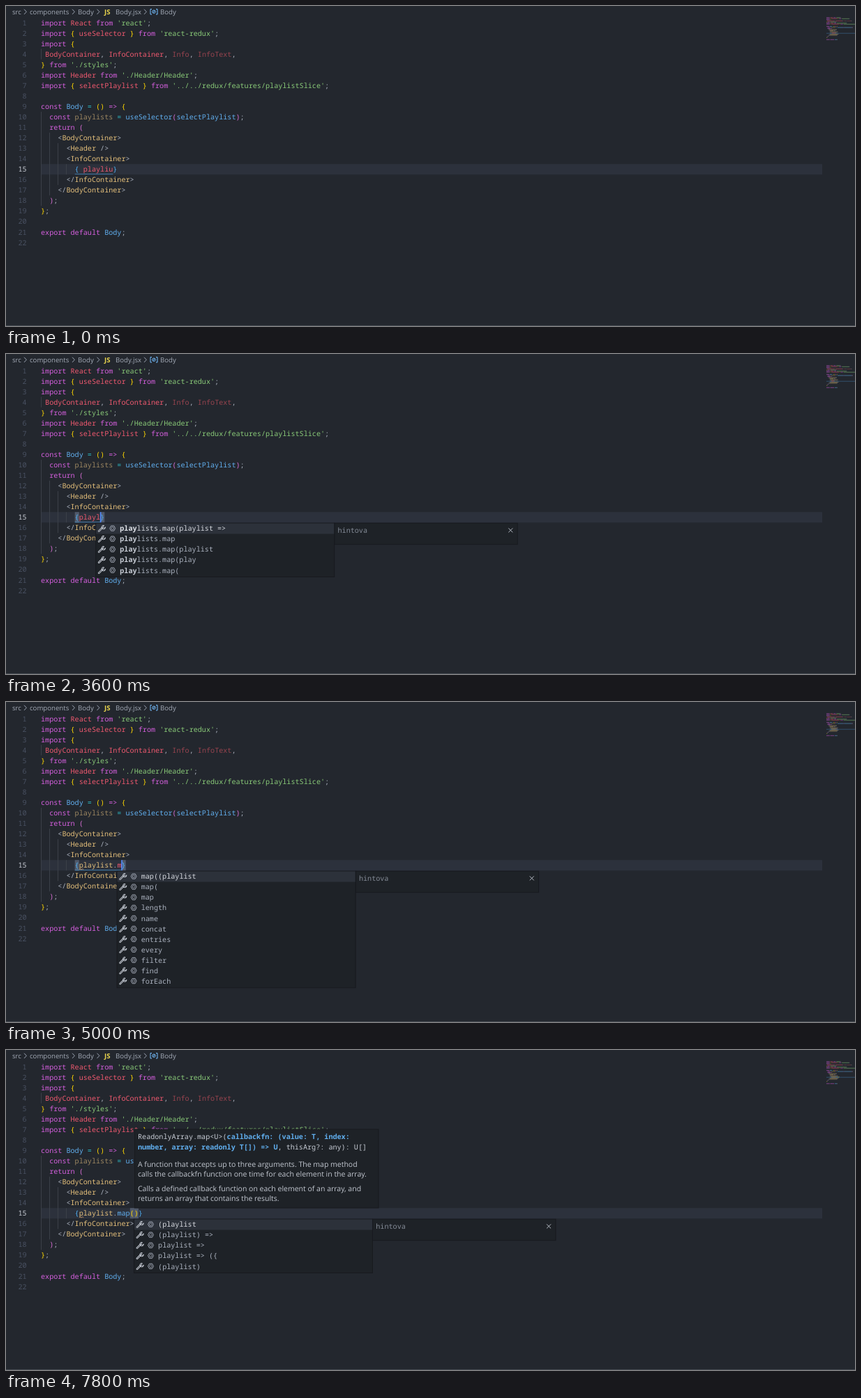
Recreate the animation shown at these times as an HTML page. Size 1217x460 px, loop 8 s.

```html
<!DOCTYPE html>
<html lang="en">
<head>
<meta charset="utf-8">
<title>Editor typing</title>
<style>
html, body { margin: 0; width: 100%; height: 100%; overflow: hidden; background: #23272e; }
svg { display: block; width: 100%; height: 100%; }
text { white-space: pre; text-rendering: geometricPrecision; }
.mono { font: 10.142px "Noto Sans Mono", "DejaVu Sans Mono", monospace; }
.ui { font: 9.65px "Open Sans", "Noto Sans", sans-serif; }
.doc { font: 10.5px "Open Sans", "Noto Sans", sans-serif; }
.b { font-weight: 700; }
</style>
</head>
<body>
<svg viewBox="0 0 1217 460">
  <g id="under"></g>
  <g id="base"></g>
  <g id="over"></g>
</svg>
<script>
const LOOP = 8000, X0 = 50, CW = 6.085, Y0 = 16.5, LH = 15.05;
const C = {
  p: '#d55fde', r: '#ef596f', g: '#89ca78', b: '#61afef', y: '#e5c07b', c: '#2bbac5', w: '#abb2bf',
  R: '#98444f', Y: '#9d8761', 1: '#ffd700', 2: '#da70d6', 3: '#4fb0f5'
};

// Each token is a colour key followed by its text.
const CODE = [
  "pimport |rReact |pfrom |g'react'|w;",
  "pimport |1{ |ruseSelector |1} |pfrom |g'react-redux'|w;",
  "pimport |1{",
  "w |rBodyContainer|w, |rInfoContainer|w, |RInfo|w, |RInfoText|w,",
  "1} |pfrom |g'./styles'|w;",
  "pimport |rHeader |pfrom |g'./Header/Header'|w;",
  "pimport |1{ |rselectPlaylist |1} |pfrom |g'../../redux/features/playlistSlice'|w;",
  "",
  "pconst |bBody |c= |1() |p=> |1{",
  "w  |pconst |Yplaylists |c= |buseSelector|2(|bselectPlaylist|2)|w;",
  "w  |preturn |2(",
  "w    <|yBodyContainer|w>",
  "w      <|yHeader |w/>",
  "w      <|yInfoContainer|w>",
  "",
  "w      </|yInfoContainer|w>",
  "w    </|yBodyContainer|w>",
  "w  |2)|w;",
  "1}|w;",
  "",
  "pexport |pdefault |bBody|w;",
  ""
];

const LISTS = {
  open: ['playlists.map((playlist', 'playlists', 'playlists.map', 'playlist', 'play'],
  p: ['playlists', 'playlistSlice', 'play', 'public', 'private'],
  play: ['playlists.map(playlist =>', 'playlists.map', 'playlists.map(playlist', 'playlists.map(play', 'playlists.map('],
  playlist: ['playlists.map(playlist =>', 'playlists.map(playlist', 'playlists.map(playlist => ({', 'playlists.map(play', 'playlists.length'],
  dot: ['map((playlist', 'map(', 'map', 'length', 'name', 'concat', 'entries', 'every', 'filter', 'find', 'forEach'],
  m: ['map((playlist', 'map(playlist', 'map', 'map(', 'map(('],
  map: ['map((playlist'],
  call: ['(playlist', '(playlist) =>', 'playlist =>', 'playlist => ({', '(playlist)']
};

// time, line text, caret column (0 = hidden), list, list column, matched characters
const STEPS = [
  [0, '{ playliu}', 0],
  [500, '', 0],
  [1500, '', 8],
  [1900, '', 0],
  [2300, '{}', 9],
  [2400, '{}', 9, 'open', 9, 0],
  [2800, '{}', 0, 'open', 9, 0],
  [3000, '{p}', 10, 'p', 10, 1],
  [3100, '{pl}', 11, 'p', 10, 1],
  [3200, '{pl}', 11, 'play', 11, 2],
  [3300, '{pla}', 12, 'play', 12, 3],
  [3400, '{play}', 13, 'play', 13, 4],
  [3600, '{playl}', 14, 'play', 13, 4],
  [3700, '{playl}', 14, 'play', 14, 5],
  [3900, '{playli}', 15, 'playlist', 15, 6],
  [4000, '{playlis}', 16, 'playlist', 16, 7],
  [4100, '{playlist}', 17, 'playlist', 17, 8],
  [4500, '{playlist.}', 18],
  [4600, '{playlist.}', 18, 'dot', 18, 0],
  [5000, '{playlist.m}', 19, 'dot', 18, 0],
  [5100, '{playlist.m}', 19, 'm', 19, 1],
  [5200, '{playlist.ma}', 20, 'm', 20, 2],
  [5300, '{playlist.map}', 21, 'map', 21, 3],
  [5600, '{playlist.map8}', 22, 'map', 21, 3],
  [5700, '{playlist.map}', 21, 'map', 21, 3],
  [6200, '{playlist.map}', 0, 'map', 21, 3],
  [6500, '{playlist.map()}', 22],
  [6600, '{playlist.map()}', 22, 'call', 22, 0],
  [6900, '{playlist.map()}', 0, 'call', 22, 0],
  [7400, '{playlist.map()}', 22, 'call', 22, 0],
  [7800, '{playlist.map()}', 0, 'call', 22, 0]
];

const $ = id => document.getElementById(id);
const esc = s => s.replace(/&/g, '&amp;').replace(/</g, '&lt;').replace(/>/g, '&gt;');
const colX = n => X0 + n * CW;
const rowY = n => Y0 + (n - 1) * LH;
const rect = (x, y, w, h, fill, extra = '') =>
  `<rect x="${x}" y="${y}" width="${w}" height="${h}" fill="${fill}" ${extra}/>`;
const path = (d, stroke, w = 1, extra = '') =>
  `<path d="${d}" fill="none" stroke="${stroke}" stroke-width="${w}" ${extra}/>`;
const span = (s, fill, cls = '') => `<tspan fill="${fill}" class="${cls}">${esc(s)}</tspan>`;
const text = (x, y, body, cls = 'mono', extra = '') =>
  `<text x="${x}" y="${y}" class="${cls}" ${extra}>${body}</text>`;
const parse = s => s ? s.split('|').map(t => [C[t[0]], t.slice(1)]) : [];
const codeLine = (n, tokens) =>
  text(X0, rowY(n) + 11, tokens.map(([fill, s]) => span(s, fill)).join(''));

function miniLine(n, tokens) {
  let col = 0, out = '';
  for (const [fill, s] of tokens) {
    for (const m of s.matchAll(/\S+/g))
      out += rect(1176 + (col + m.index) * 0.79, 16.2 + (n - 1) * 1.58, m[0].length * 0.79, 1, fill, 'opacity=".5"');
    col += s.length;
  }
  return out;
}

function breadcrumbs() {
  const label = (x, s) => text(x, 11.7, span(s, '#a3aab6'), 'ui');
  const chevrons = [28, 97, 132.5, 200]
    .map(x => path(`M${x - 2} 4.7l3.4 3.6l-3.4 3.6`, '#9da5b4')).join('');
  const symbol = path('M209 4.5h-2v7.5h2M215 4.5h2v7.5h-2', '#75beff') +
    `<circle cx="212" cy="8.2" r="2.2" fill="none" stroke="#75beff"/>` + path('M210.5 9.5l3-2.5', '#75beff');
  return label(9, 'src') + label(34, 'components') + label(103, 'Body') +
    text(141, 11.7, span('JS', '#e8d44d', 'b'), 'ui') +
    label(157, 'Body.jsx') + label(221, 'Body') + chevrons + symbol;
}

function guide(col, from, to) {
  return rect(Math.floor(colX(col)), rowY(from), 1, (to - from + 1) * LH, '#3b4048');
}

function drawBase() {
  let out = breadcrumbs();
  out += guide(0, 4, 4) + guide(0, 10, 18) + guide(2, 12, 17) + guide(4, 13, 16) + guide(6, 15, 15);
  CODE.forEach((src, i) => {
    const n = i + 1, tokens = parse(src);
    out += text(29.6, rowY(n) + 11, span(String(n), n === 15 ? '#c8ccd4' : '#495162'), 'mono', 'text-anchor="end"');
    out += codeLine(n, tokens) + miniLine(n, tokens);
  });
  return out + rect(0, 459, 1217, 1, '#444950');
}

function liveTokens(s) {
  const m = s.match(/^\{( ?\w*)(\.?)(\w*)(\(?\)?)\}$/);
  if (!m) return [];
  const [, name, dot, prop, call] = m;
  return [[C.w, ' '.repeat(8)], [C[3], '{'], [dot ? C.y : C.r, name], [C.w, dot],
    [call ? C.b : C.r, prop], [C[1], call], [C[3], '}']];
}

function icons(x, y) {
  const wrench = path(`M${x - 4.6} ${y + 4}l5-5`, '#c5cad3', 2.6, 'stroke-linecap="round"') +
    path(`M${x - 4.6} ${y + 4}l5-5`, '#1e2227', 0.9, 'stroke-linecap="round"') +
    path(`M${x + 2.8} ${y - 4.2}a2.7 2.7 0 1 0 2 2.4l-2 1.6l-1.5-1.5z`, '#c5cad3', 1);
  const h = x + 15;
  const ring = path(`M${h - 4} ${y}l2-3.6h4l2 3.6l-2 3.6h-4z`, '#abb2bf', 0.9) +
    `<circle cx="${h}" cy="${y}" r="1.9" fill="none" stroke="#abb2bf" stroke-width=".8"/>`;
  return wrench + ring;
}

function popup(items, col, hit) {
  const x = colX(col) - 0.4, y = 243.2, w = 342, dx = x + w;
  const edge = 'stroke="#181a1f"';
  let out = rect(dx, y, 262.5, 30.5, '#1e2227', edge) +
    rect(x, y, w, items.length * LH + (items.length > 1 ? 2 : 0.5), '#1e2227', edge) +
    rect(x + 0.5, y + 0.3, w - 1, LH, '#2c313a');
  items.forEach((s, i) => {
    const cy = 250.6 + i * LH, fill = i ? '#abb2bf' : '#d7dae0';
    out += icons(x + 9, cy) +
      text(x + 34.6, cy + 3.7, span(s.slice(0, hit), i ? '#c8cdd6' : '#e2e5ea', 'b') + span(s.slice(hit), fill));
  });
  return out + text(dx + 4.8, 256.8, span('hintova', '#858c98')) +
    path(`M${dx + 249.6} 250.4l6 6m0-6l-6 6`, '#b5bac4');
}

function signature() {
  const x = 189, plain = '#c8cdd6', para = (y, s) => text(x, y, span(s, '#c3c8d1'), 'doc');
  return rect(184.5, 114, 349.5, 113, '#1e2227', 'stroke="#181a1f"') +
    text(x, 128.3, span('ReadonlyArray.map<U>(', plain) + span('callbackfn: (value: T, index:', C.b, 'b')) +
    text(x, 142.7, span('number, array: readonly T[]) => U', C.b, 'b') + span(', thisArg?: any): U[]', plain)) +
    para(167.6, 'A function that accepts up to three arguments. The map method') +
    para(182, 'calls the callbackfn function one time for each element in the array.') +
    para(202.6, 'Calls a defined callback function on each element of an array, and') +
    para(217, 'returns an array that contains the results.');
}

function draw([t, src, caret, list, col, hit]) {
  const y = rowY(15), end = 8 + src.length, call = src.includes('(');
  const mark = (c, n = 15) => rect(colX(c), rowY(n), CW, LH, '#515a6b');
  let under = rect(50, y, 1120, LH, '#2c313c') + rect(1176, 38.6, 41, 1.4, '#2d445a');
  if (t >= 1500) {
    if (!src) under += mark(6, 14) + mark(21, 16);
    else if (call) under += mark(end - 3) + mark(end - 2);
    else under += mark(8) + mark(end - 1);
  }
  const tokens = liveTokens(src);
  let over = codeLine(15, tokens) + miniLine(15, tokens);
  if (!src) over += path('M110.5 181.5H62.5V272.5H68', '#b45fb4', 1);
  else if (!call) over += rect(colX(8), y + 14, (src.length - 1) * CW, 1, C[3], 'opacity=".6"');
  if (src.includes('.')) over += path('M105 241.2l1.5-1.5l1.5 1.5l1.5-1.5l1.5 1.5', '#d19a66', 0.9);
  if (caret) over += rect(colX(caret) - 0.4, y, 1.6, LH, '#528bff');
  if (list) over += popup(LISTS[list], col, hit);
  if (list === 'call') over += signature();
  $('under').innerHTML = under;
  $('over').innerHTML = over;
}

let shown = null;
const start = performance.now();
function tick() {
  const t = (performance.now() - start) % LOOP;
  const step = STEPS.findLast(s => s[0] <= t);
  if (step !== shown) draw(shown = step);
  requestAnimationFrame(tick);
}
$('base').innerHTML = drawBase();
tick();
</script>
</body>
</html>
```
